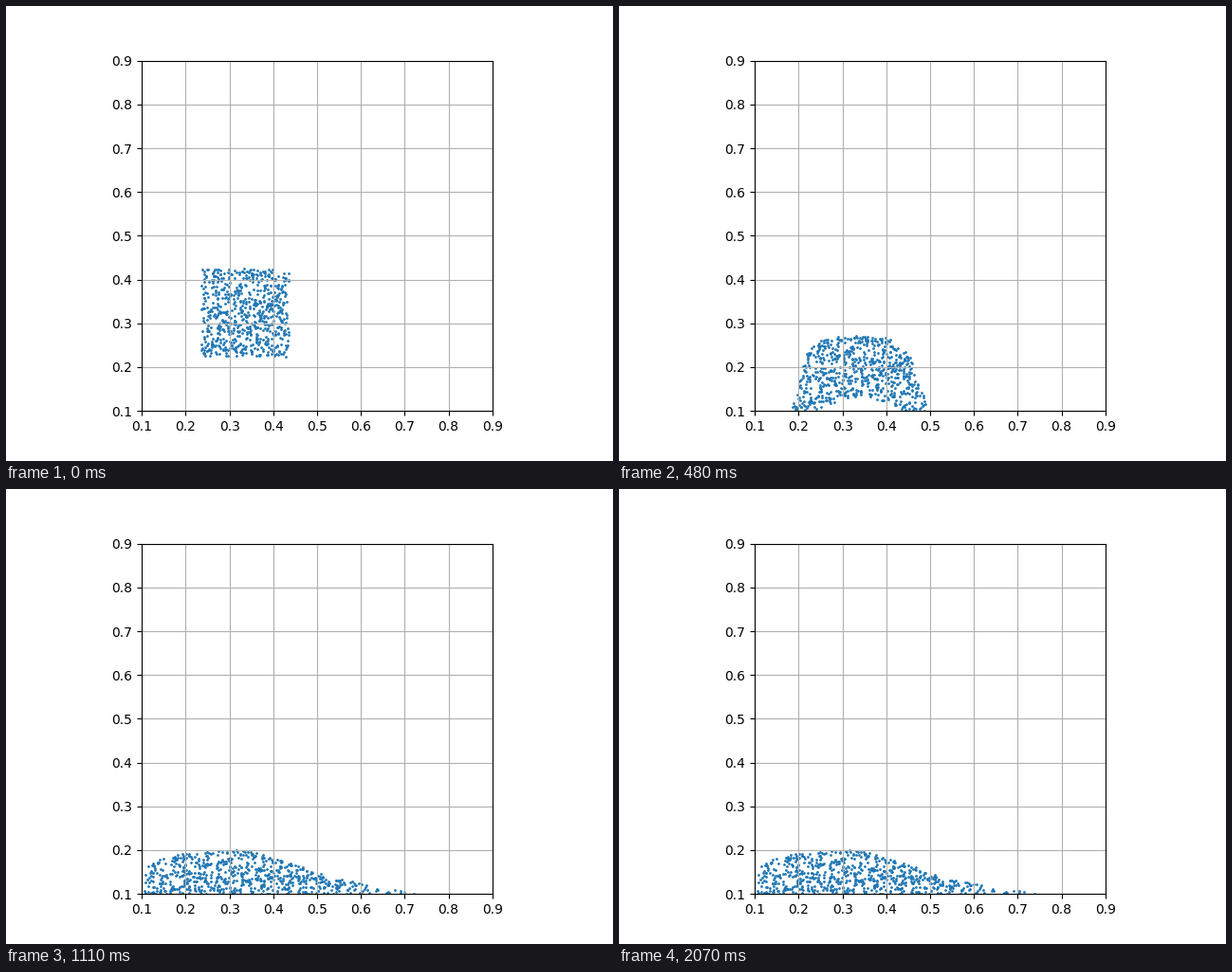
Recreate the animation shown at these times as a matplotlib script. Size 640x480 px, loop 2.1 s.

```python
import numpy as np
import matplotlib.pyplot as plt
from matplotlib.animation import FuncAnimation

FRAMES, INTERVAL = 70, 30
COUNT = 680
FLOOR = 0.1
X0, Y0, SIDE = 0.2355, 0.2245, 0.2
DROP = 0.03 / 36                           # fall per frame squared
IMPACT = np.sqrt((Y0 - FLOOR) / DROP)      # moment the block lands

rng = np.random.default_rng(7)
u, v = rng.random((2, COUNT))


def block(y):
    return np.column_stack([X0 + SIDE * u, y + SIDE * v])


def bulge():
    """Just after landing: spreading foot, rounded top, hollow base."""
    left = 0.183 + 0.032 * v
    right = 0.498 - 0.045 * v
    edge = np.abs(2 * u - 1)
    top = 0.271 - 0.046 * edge ** 4
    base = FLOOR + 0.031 * np.clip(1 - (edge / 0.62) ** 2, 0, 1)
    return np.column_stack([left + (right - left) * u, base + (top - base) * v])


def heap(peak, right, height, bulk, bend, left=0.104):
    """Fill a mound evenly: round against the wall, thin at the right."""
    x = np.linspace(left, right, 600)
    l = np.clip((peak - x) / (peak - left), 0, 1)
    r = np.clip((x - peak) / (right - peak), 0, 1)
    h = height * (1 - l ** 2) ** bulk * (1 - r ** bend) ** 1.25 + 0.002
    area = np.cumsum(h)
    area = (area - area[0]) / (area[-1] - area[0])
    cx = np.interp(u, area, x)
    return np.column_stack([cx, FLOOR + np.interp(cx, x, h) * v])


def creep(pos):
    """The right-hand tail slides on and thins out."""
    s = np.clip((pos[:, 0] - 0.39) / 0.31, 0, 1)
    x = pos[:, 0] + 0.058 * s ** 3
    y = FLOOR + (pos[:, 1] - FLOOR) * (1 - 0.2 * s)
    return np.column_stack([x, y])


slump = heap(0.35, 0.63, 0.108, 0.4, 1.6)
rest = heap(0.33, 0.7, 0.098, 0.2, 1.2)
times = np.array([IMPACT, 16, 23, 31, 43])
poses = np.array([block(FLOOR), bulge(), slump, rest, creep(rest)])

# Monotone cubic slopes: no overshoot, at rest at the end
step = np.diff(times)
rate = np.diff(poses, axis=0) / step[:, None, None]
slope = np.zeros_like(poses)
slope[0] = rate[0]
a, b = rate[:-1], rate[1:]
same = a * b > 0
slope[1:-1] = np.where(same, 2 * a * b / np.where(same, a + b, 1), 0)


def positions(n):
    if n < IMPACT:
        return block(Y0 - DROP * n * n)
    if n >= times[-1]:
        return poses[-1]
    i = np.searchsorted(times, n, side="right") - 1
    h = step[i]
    t = (n - times[i]) / h
    return ((1 + 2 * t) * (1 - t) ** 2 * poses[i]
            + t * (1 - t) ** 2 * h * slope[i]
            + t * t * (3 - 2 * t) * poses[i + 1]
            + t * t * (t - 1) * h * slope[i + 1])


fig, ax = plt.subplots(figsize=(6.4, 4.8), dpi=100)
ax.set_aspect("equal")
ax.set_xlim(0.1, 0.9)
ax.set_ylim(0.1, 0.9)
ax.grid(True)
sand = ax.scatter(*positions(0).T, s=1)


def update(n):
    sand.set_offsets(positions(n))
    return sand,


anim = FuncAnimation(fig, update, frames=FRAMES, interval=INTERVAL,
                     repeat=True, repeat_delay=0)
plt.show()
```
